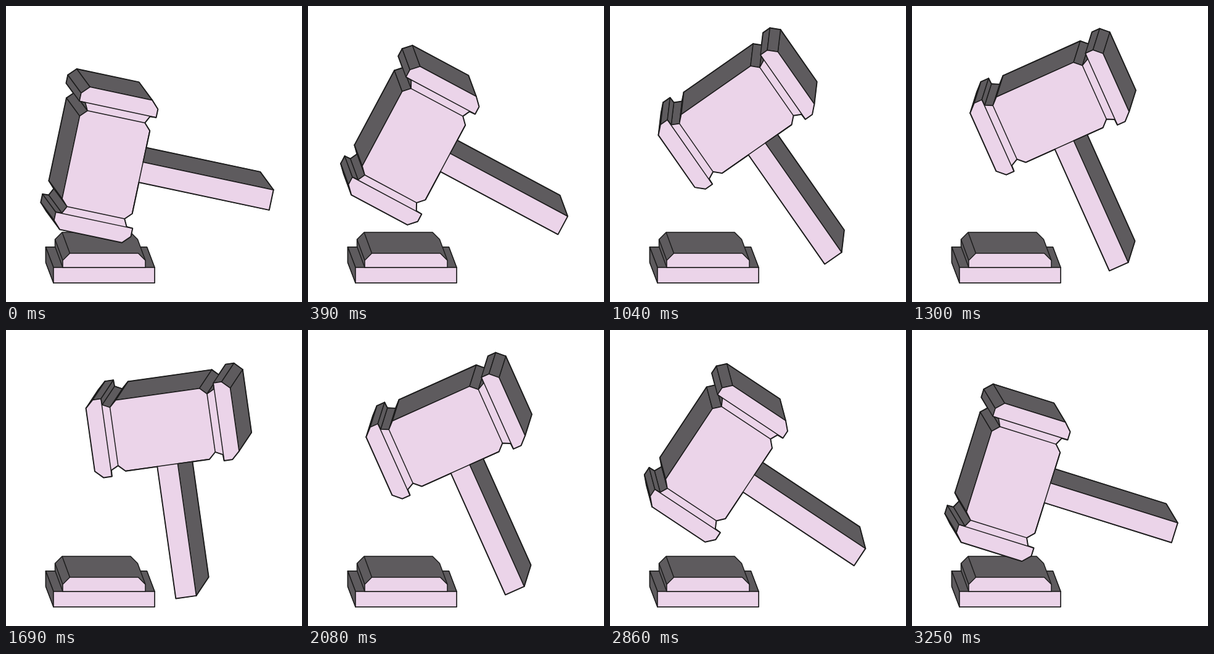
Animation of 480 by 480 pixels, one loop 3.38 s. Source, as an HTML page with a canvas:

```html
<!DOCTYPE html>
<html>
<head>
<meta charset="utf-8">
<style>
html, body { margin: 0; width: 100%; height: 100%; overflow: hidden; background: #fff; }
canvas { display: block; }
</style>
</head>
<body>
<canvas id="stage" width="480" height="480"></canvas>
<script>
const ctx = document.getElementById('stage').getContext('2d');
const PINK = '#ebd4e9', DARK = '#5e5b5e', INK = '#1c1c1c';
const LINE = 1.5, CONTOUR = 2.4;
const STEP = 130, STEPS = 26, REST = -78, SWING = 70;
const PIVOT = [276.4, 275.1];

const shift = (points, [dx, dy]) => points.map(([x, y]) => [x + dx, y + dy]);
const rect = (l, t, r, b) => [[l, t], [r, t], [r, b], [l, b]];
const bevelled = (l, t, r, b, cut) =>
  [[l, b], [l, t + cut], [l + cut, t], [r - cut, t], [r, t + cut], [r, b]];

function path(points, fill, width = LINE) {
  ctx.beginPath();
  points.forEach(([x, y]) => ctx.lineTo(x, y));
  if (fill) {
    ctx.closePath();
    ctx.fillStyle = fill;
    ctx.fill();
  }
  ctx.lineWidth = width;
  ctx.stroke();
}

// Visible side faces of a clockwise outline pushed back by depth, farthest first.
function sideFaces(outline, [ex, ey]) {
  const reach = ([p, q]) => (p[0] + q[0]) * ex + (p[1] + q[1]) * ey;
  return outline
    .map((p, i) => [p, outline[(i + 1) % outline.length]])
    .filter(([p, q]) => (q[1] - p[1]) * ex > (q[0] - p[0]) * ey)
    .sort((a, b) => reach(a) - reach(b))
    .map(edge => [...edge, ...shift(edge, [ex, ey]).reverse()]);
}

function drawPrism(outline, faces, contour) {
  for (const width of [contour, LINE]) {
    faces.forEach(face => path(face, DARK, width));
    path(outline, PINK, width);
  }
}

// The head is one quarter (body corner, neck, cap) mirrored both ways.
const quarter = [[68.5, 58], [79.5, 47.5], [91.5, 53.5], [92, 63.5], [105.5, 63.5], [118, 51.5]];
const corner = (sx, sy) => quarter.map(([x, y]) => [x * sx, y * sy]);
const gavel = [
  ...corner(-1, -1).reverse(), ...corner(1, -1), ...corner(1, 1).reverse(),
  ...rect(-16.6, 58, 16.6, 274).slice(1), [-16.6, 58],
  ...corner(-1, 1)
];
// The underside notch of the left cap stays open.
const gavelFaces = sideFaces(gavel, [24, -27]).filter(([[x, y]]) => x > 0 || y < 0);

const slab = rect(77, 424, 241, 449);
const slabFaces = sideFaces(slab, [-12.5, -33]);
const block = bevelled(92, 401, 226, 424, 11.5);
const blockBack = shift(block, [-12.5, -34]);

function drawBase() {
  drawPrism(slab, slabFaces, LINE);
  path([block[0], ...blockBack.slice(0, 5), block[4]], DARK);
  for (const i of [1, 2]) path([block[i], blockBack[i]]);
  path(block, PINK);
}

function drawGavel(degrees) {
  ctx.save();
  ctx.translate(...PIVOT);
  ctx.rotate(degrees * Math.PI / 180);
  ctx.translate(-6.5, -115.5);
  drawPrism(gavel, gavelFaces, CONTOUR);
  for (const side of [-1, 1]) {
    path([[92 * side, -63.5], [92 * side, 63.5]]);
    path([[79.5 * side, -47.5], [79.5 * side, 47.5]]);
  }
  path([[-68.5, 58], [68.5, 58]]);
  ctx.restore();
}

function draw() {
  const step = Math.floor(performance.now() / STEP) % STEPS;
  const lift = Math.min(step, STEPS - step) / (STEPS / 2);
  ctx.clearRect(0, 0, 480, 480);
  ctx.strokeStyle = INK;
  ctx.lineJoin = 'round';
  drawBase();
  drawGavel(REST + SWING * lift);
  requestAnimationFrame(draw);
}
draw();
</script>
</body>
</html>
```
